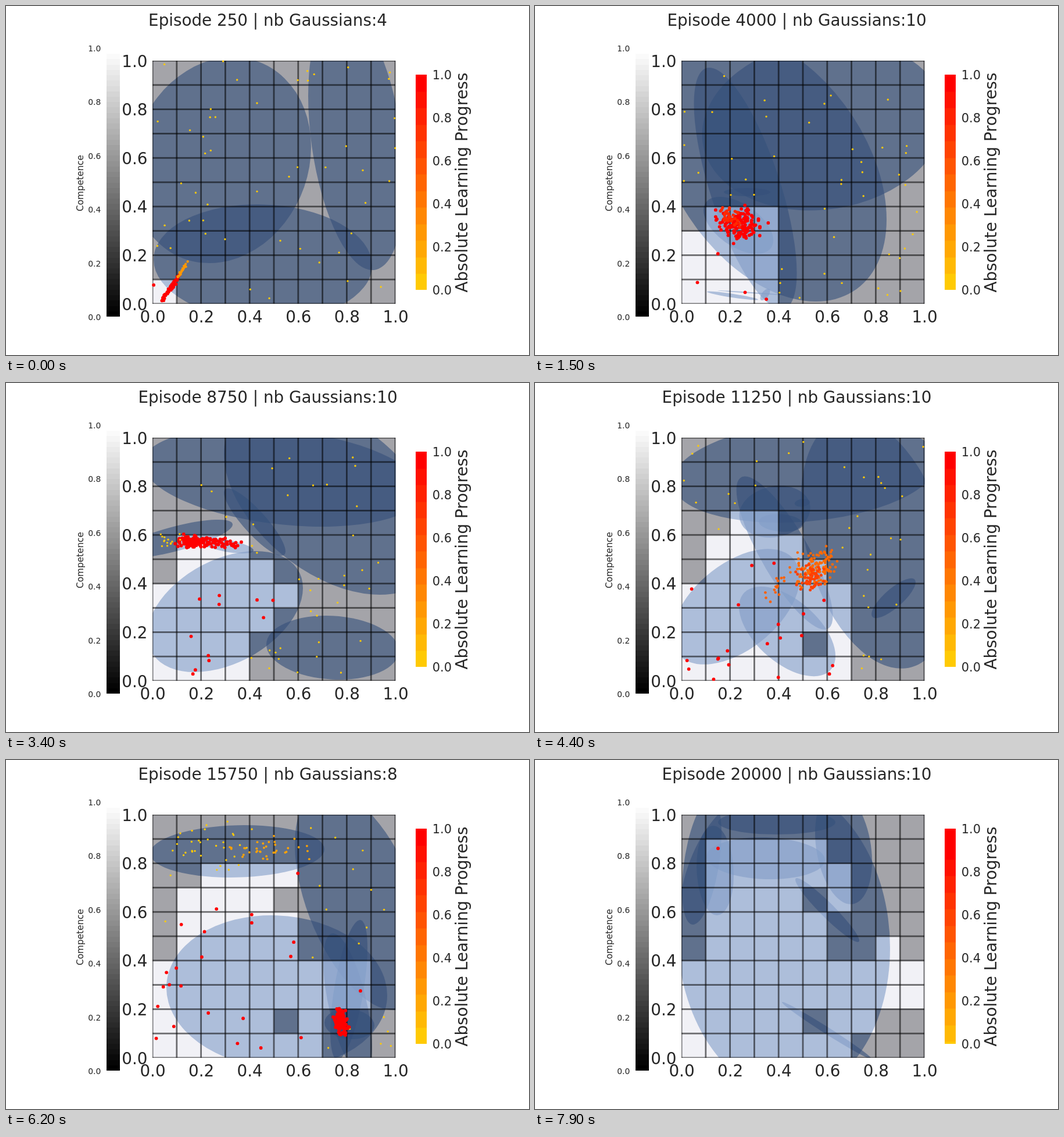
These frames come from a looping animation (900x600 px, 8 s). An HTML page with a canvas:

```html
<!DOCTYPE html>
<html lang="en">
<head>
<meta charset="utf-8">
<style>
html, body { margin: 0; width: 100%; height: 100%; overflow: hidden; background: #fff; }
canvas { display: block; }
</style>
</head>
<body>
<canvas id="stage" width="900" height="600"></canvas>
<script>
const c = document.getElementById('stage').getContext('2d');
const STEP = 100, STEPS = 80, LEFT = 252, TOP = 94, SIDE = 418, CELL = SIDE / 10;
const scenes = [];

// lit: per row from the bottom, the last learned column or [first, last, extra]
// ellipses: centre x, y, half width, half height, correlation
// clusters: count, centre x, y, spread x, y, correlation, progress
const scene = (step, count, scatter, lit, ellipses, clusters) =>
  scenes.push({ step, count, scatter, lit, ellipses, clusters });

scene(0, 4, 49, [0],
  [[370, 265, 155, 177, -.13], [442, 441, 188, 100, .05], [603, 229, 83, 225, .33]],
  [[70, 282, 487, 7, 10, -.97, 1], [35, 302, 456, 4.5, 7, -.95, .25]]);

scene(8, 10, 52, [1, 2, [2, 2]],
  [[512, 250, 190, 193, -.22], [340, 288, 157, 230, .42], [320, 270, 111, 255, .73], [340, 428, 44, 62, .85]],
  [[170, 350, 431, 9.5, 17, .25, 1], [14, 318, 402, 8, 9, .3, .6]]);

scene(22, 10, 60, [3, 3, 3, [1, 3]],
  [[480, 160, 227, 100, 0], [472, 265, 241, 233, .36], [404, 357, 66, 160, .67], [360, 326, 76, 36, .2],
    [365, 320, 80, 14, 0], [340, 498, 88, 15, .9], [372, 493, 116, 8, .97], [396, 496, 17, 20, -.6]],
  [[110, 355, 320, 28, 7, 0, 1], [60, 355, 322, 8, 8, 0, 1]]);

scene(34, 10, 52, [3, 3, 4, 5, 4, 3],
  [[476, 162, 240, 85, .28], [560, 197, 185, 167, .45], [428, 239, 53, 58, .87], [377, 393, 134, 104, -.39],
    [562, 455, 114, 55, .1], [291, 268, 99, 33, -.75], [380, 280, 46, 13, .6]],
  [[130, 322, 272, 14, 5, .1, 1], [50, 368, 275, 15, 5, .3, 1], [12, 278, 270, 8, 6, 0, 0]]);

scene(53, 10, 32, [6, 6, 6, 6, 5, 5, [2, 4], [4, 5]],
  [[455, 144, 218, 90, -.63], [612, 345, 81, 260, .22], [431, 340, 110, 198, .78], [318, 377, 88, 95, -.6],
    [319, 402, 55, 97, .95], [522, 179, 27, 55, .4], [462, 205, 31, 17, -.25], [460, 206, 25, 13, -.2],
    [617, 370, 72, 65, -.8]],
  [[150, 630, 358, 21, 25, -.7, 0], [55, 571, 390, 11, 16, -.5, .4], [18, 535, 428, 7, 14, -.4, 1]]);

scene(62, 8, 45, [6, 6, 8, 8, 5, 5, 4, [2, 5]],
  [[398, 157, 150, 45, -.08], [610, 240, 113, 190, .5], [466, 398, 190, 131, .05], [588, 420, 42, 122, .6],
    [590, 395, 32, 120, -.6], [591, 454, 43, 26, .1]],
  [[130, 577, 450, 5, 11, 0, 1], [35, 460, 157, 38, 10, 0, .2], [30, 355, 145, 45, 20, 0, 0]]);

scene(79, 10, 0, [6, 7, 9, 9, [1, 5, 8], 5, [1, 4, 6], 6, 5],
  [[416, 107, 101, 21, 0], [531, 150, 49, 98, .25], [428, 310, 183, 265, .05], [397, 169, 102, 36, .08],
    [503, 258, 55, 55, .95], [287, 175, 34, 108, -.45], [310, 190, 32, 77, .1], [502, 465, 77, 49, .99]],
  [[1, 315, 152, 0, 0, 0, 1]]);

let seed = 1;
function rand() {
  seed = (seed * 48271) % 2147483647;
  return seed / 2147483647;
}
const gauss = () => (rand() + rand() + rand() + rand() - 2) * 1.73;

function box(color, x, y, w, h) {
  c.fillStyle = color;
  c.fillRect(x, y, w, h);
}

function text(str, x, y, size, align, turn = 0) {
  c.save();
  c.translate(x, y);
  c.rotate(turn);
  c.font = size + 'px "DejaVu Sans", sans-serif';
  c.textAlign = align;
  c.fillStyle = '#262626';
  c.fillText(str, 0, 0);
  c.restore();
}

const heat = v => `rgb(255,${Math.round(202 * (1 - v))},${Math.round(4 * (1 - v))})`;

function dot(x, y, v) {
  c.fillStyle = heat(v);
  c.beginPath();
  c.arc(x, y, 1.7 + 1.2 * v, 0, 7);
  c.fill();
}

function ellipse([x, y, w, h, r]) {
  c.save();
  c.transform(w, r * h, 0, h * Math.sqrt(1 - r * r), x, y);
  c.beginPath();
  c.arc(0, 0, 1, 0, 7);
  c.restore();
  c.fill();
}

// Blends two lists of shapes; an unpaired shape shrinks to what gone() gives
function blend(a, b, f, gone) {
  const out = [];
  for (let i = 0; i < Math.max(a.length, b.length); i++) {
    const p = a[i] || gone(b[i]), q = b[i] || gone(a[i]);
    out.push(p.map((n, j) => n + (q[j] - n) * f));
  }
  return out;
}

function isLit({ lit }, col, row) {
  if (row >= lit.length || (row === 1 && col === 5)) return false;
  const [first, last, extra] = [].concat(lit[row].length ? lit[row] : [row < 4 ? 0 : 1, lit[row]]);
  return (col >= first && col <= last) || col === extra;
}

function bars(step) {
  for (let i = 0; i < 50; i++) {
    const g = Math.round(255 * (1 - i / 49));
    box(`rgb(${g},${g},${g})`, 173, Math.round(73 + i * 9.22), 23, i < 49 ? 10 : 9);
  }
  const shift = step >= 73 ? 24 : 0, band = 370 / 13;
  c.save();
  c.beginPath();
  c.rect(705, 118, 19, 370);
  c.clip();
  for (let i = 0; i < 14; i++) {
    box(heat(Math.min(1, i / 12)), 705, Math.round(488 + shift - band * (i + 1)), 19, band + 1);
  }
  c.restore();
}

function labels(step, count) {
  text(`Episode ${250 * (step + 1)} | nb Gaussians:${count}`, 450.5, 34, 27.78, 'center');
  for (let i = 0; i < 6; i++) {
    const s = (i / 5).toFixed(1);
    text(s, LEFT + .5 + i * SIDE / 5, 544, 27.78, 'center');
    text(s, 243.5, 522.5 - i * SIDE / 5, 27.78, 'right');
    text(s, 163.3, 540 - i * 92.4, 13.89, 'right');
    text(s, 733.8, 496 - i * 74, 20.83, 'left');
  }
  text('Competence', 132.5, 304.5, 15.28, 'center', -Math.PI / 2);
  text('Absolute Learning Progress', 794, 303.5, 27.78, 'center', -Math.PI / 2);
}

function draw(step) {
  let n = 0;
  while (n < scenes.length - 2 && scenes[n + 1].step <= step) n++;
  const a = scenes[n], b = scenes[n + 1];
  const f = (step - a.step) / (b.step - a.step);
  const near = f < .5 ? a : b;
  const lit = (col, row) => isLit(f < .1 + (col + row) / 23 ? a : b, col, row);
  seed = 1 + (step + 1) * 7919;

  box('#fff', 0, 0, 900, 600);
  bars(step);
  labels(step, near.count);

  c.save();
  c.beginPath();
  c.rect(LEFT, TOP, SIDE + .5, SIDE);
  c.clip();
  box('#eaeaf2', LEFT, TOP, SIDE + 1, SIDE);
  c.fillStyle = 'rgba(76,114,176,.6)';
  blend(a.ellipses, b.ellipses, f, e => [e[0], e[1], 0, 0, e[4]]).forEach(ellipse);

  // Competence map lies over the ellipses
  c.globalAlpha = .3;
  const edge = i => Math.round(i * CELL);
  for (let row = 0; row < 10; row++) for (let col = 0; col < 10; col++) {
    box(lit(col, row) ? '#fff' : '#000', LEFT + edge(col), TOP + edge(9 - row),
      edge(col + 1) - edge(col), edge(10 - row) - edge(9 - row));
  }
  c.globalAlpha = .55;
  for (let i = 0; i <= 10; i++) {
    box('#000', LEFT + i * CELL - 1.4, TOP, 2.8, SIDE);
    box('#000', LEFT, TOP + i * CELL - 1.4, SIDE, 2.8);
  }
  c.restore();

  c.save();
  c.beginPath();
  c.rect(LEFT - 1, TOP - 1, SIDE + 2, SIDE + 1);
  c.clip();
  // Explored goals are red where the cell is learned
  const scatter = f < 1 ? a.scatter : b.scatter;
  for (let i = 0; i < scatter; i++) {
    const x = rand() * 10, y = rand() * 10;
    dot(LEFT + x * CELL, TOP + SIDE - y * CELL, lit(x | 0, y | 0) ? 1 : 0);
  }
  const groups = blend(a.clusters, b.clusters, f, g => [0, ...g.slice(1)]);
  for (const [count, x, y, sx, sy, r, v] of groups) {
    for (let i = 0; i < Math.round(count); i++) {
      const p = gauss(), q = r * p + Math.sqrt(1 - r * r) * gauss();
      dot(x + sx * p, y + sy * q, v);
    }
  }
  c.restore();
}

let shown = -1;
const start = performance.now();
function tick() {
  const step = Math.floor((performance.now() - start) / STEP) % STEPS;
  if (step !== shown) draw(shown = step);
  requestAnimationFrame(tick);
}
tick();
</script>
</body>
</html>
```
